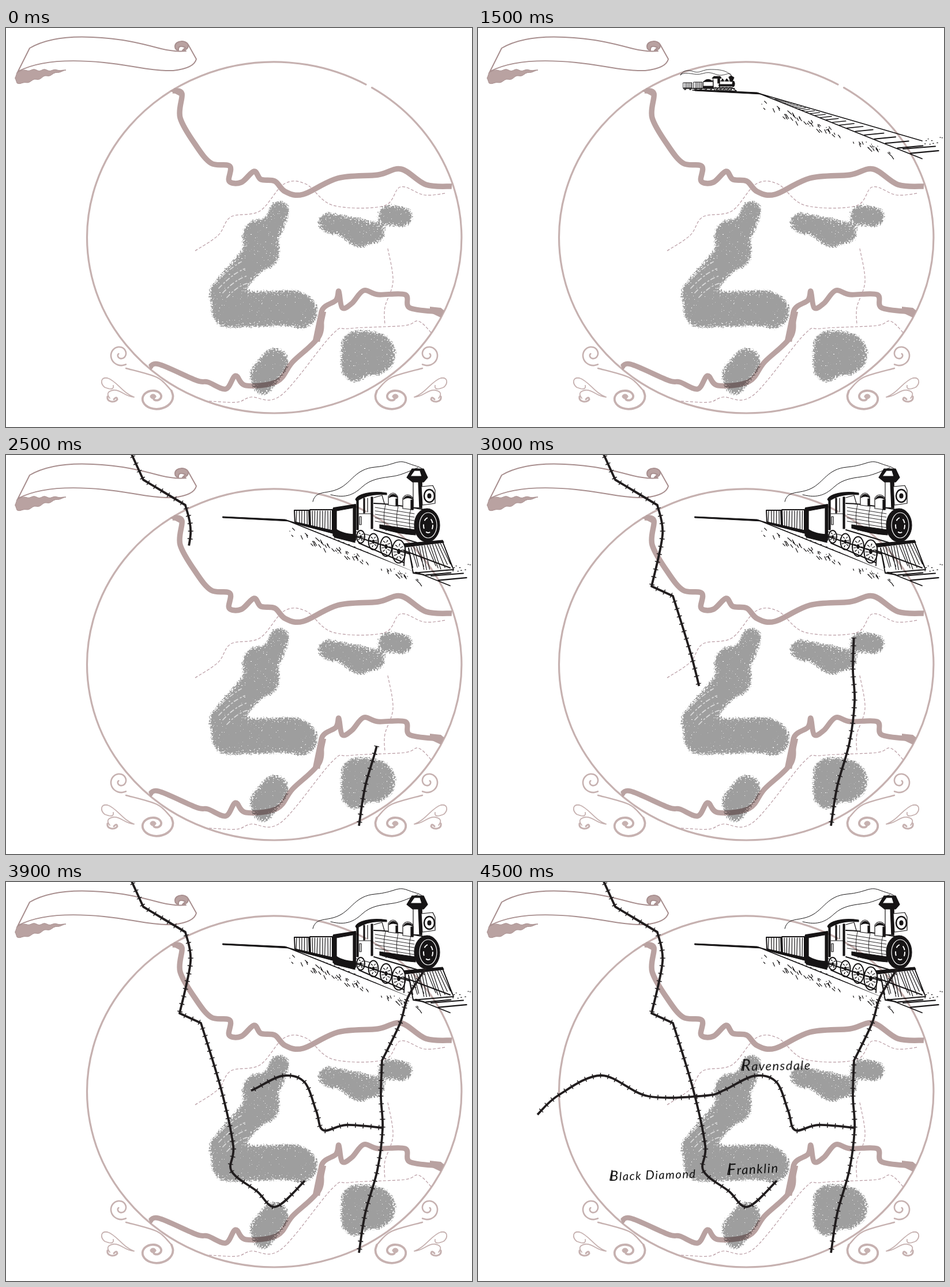
Write an HTML page that moves like this. It is 808 px wide and 693 px high and loops after 6100 ms.

```html
<!DOCTYPE html>
<html lang="en">
<head>
<meta charset="utf-8">
<title>Railway map</title>
<style>
html, body { margin: 0; width: 100%; height: 100%; overflow: hidden; background: #fff; }
svg { display: block; width: 100vw; height: 100vh; }
path, ellipse { fill: none; stroke-linecap: round; stroke-linejoin: round; }
.ink { stroke: #161415; }
.ink .solid { fill: #161415; }
.ink .paper { fill: #fff; }
.rose { stroke: #c6b1b0; }
.river { stroke: #b9a2a1; stroke-linecap: butt; }
.banner { stroke: #a88f8f; stroke-width: 2; }
.banner .solid { fill: #b9a2a1; }
.dash { stroke: #b99ba3; stroke-width: 1.2; stroke-dasharray: 5 3; stroke-linecap: butt; }
.wood { stroke: #9e9e9e; }
.multiply { mix-blend-mode: multiply; }
.line { stroke: #211d1e; stroke-width: 3.8; }
.ties { stroke: #211d1e; stroke-width: 9; stroke-dasharray: 1.5 12; stroke-dashoffset: -6; stroke-linecap: butt; }
.reveal { stroke: #fff; stroke-width: 18; stroke-dasharray: 1 2; stroke-linecap: butt; }
text { font: italic 22px Lato, "Open Sans", sans-serif; fill: #111; }

.rails, .far, .near, .mid, .engine, .reveal, .labels { animation: 6.1s step-end infinite; }
.rails { animation-name: rails; }
.far { animation-name: far; }
.near { animation-name: near; }
.mid { animation-name: mid; }
.engine { animation-name: engine; }
.labels { animation-name: labels; }
.main { animation-name: main; }
.branch { animation-name: branch; }
@keyframes rails { 0% { opacity: 0 } 8.1967%, 100% { opacity: 1 } }
@keyframes far { 0% { opacity: 0 } 16.3934% { opacity: 1 } 24.5901%, 100% { opacity: 0 } }
@keyframes near { 0% { opacity: 0 } 24.5901% { opacity: 1 } 32.7868%, 100% { opacity: 0 } }
@keyframes mid { 0% { opacity: 0 } 32.7868% { opacity: 1 } 40.9836%, 100% { opacity: 0 } }
@keyframes engine { 0% { opacity: 0 } 40.9836%, 100% { opacity: 1 } }
@keyframes labels { 0% { opacity: 0 } 73.7704%, 100% { opacity: 1 } }
@keyframes main {
  0% { stroke-dashoffset: 1.01 } 40.9836% { stroke-dashoffset: .725 }
  49.1803% { stroke-dashoffset: .36 } 57.3770%, 100% { stroke-dashoffset: 0 }
}
@keyframes branch {
  0% { stroke-dashoffset: 1.01 } 60.6557% { stroke-dashoffset: .78 } 63.9344% { stroke-dashoffset: .544 }
  67.2131% { stroke-dashoffset: .275 } 70.4918%, 100% { stroke-dashoffset: 0 }
}
</style>
</head>
<body>
<svg viewBox="0 0 808 693" preserveAspectRatio="none">
<defs>
  <filter id="grain" filterUnits="userSpaceOnUse" x="300" y="270" width="440" height="400" color-interpolation-filters="sRGB">
    <feGaussianBlur in="SourceAlpha" stdDeviation="7" result="soft"/>
    <feTurbulence type="fractalNoise" baseFrequency=".37 .41" numOctaves="3" seed="4" result="noise"/>
    <feComposite in="soft" in2="noise" operator="arithmetic" k1="3" k4="-.55"/>
    <feComponentTransfer result="spray"><feFuncA type="linear" slope="5"/></feComponentTransfer>
    <feFlood flood-color="#9e9e9e"/>
    <feComposite in2="spray" operator="in"/>
  </filter>

  <g id="train" class="ink" stroke-width=".9">
    <path stroke-width=".8" d="M351 82C356 72 366 73 375 76S390 72 402 72S432 72 440 84M351 81C363 74 375 84 390 79S412 83 422 82S437 76 439 82"/>
    <path class="paper" d="M356 95H371V104H356ZM374 94H389V105H374ZM391 93L408 91V104H391ZM408 87H419V104H408ZM419 92H442V103H419Z"/>
    <path class="solid" d="M391 93Q399 85 407 93ZM406 87L409 84H420L422 87ZM391 101H408V104H391ZM416 88H419V96H416ZM422 92Q424 84 426 92ZM429 92Q431 84 434 92ZM435 85L439 83L444 86L441 93H438ZM418 98H443V101H418Z"/>
    <ellipse class="solid" cx="443" cy="97" rx="2" ry="5"/>
    <path stroke-width="1.4" d="M356 105H445M440 104L448 109M372 108L448 109.5"/>
    <g id="small"></g>
  </g>
</defs>

<g class="rails ink">
  <path class="solid" stroke-width="1" d="M376 107L484 112L492 115L376 109Z"/>
  <path stroke-width="1.8" d="M485 113L770 196M488 114L770 227"/>
  <g id="sleepers"></g>
  <path id="grass" stroke-width="1.2"/>
</g>

<use class="far" href="#train" transform="translate(-40 1)"/>
<use class="near" href="#train"/>
<use class="mid" href="#train" transform="translate(340 40) scale(2.86) translate(-350 -71)"/>

<g class="engine ink" stroke-width="1.2">
  <path fill="#fff" style="fill:#fff" stroke="none" d="M500 95L607 86L640 64H698L705 22H728L745 60L753 150L776 199L708 203L600 157L500 118Z"/>
  <path stroke-width="1" d="M532 81C537 60 556 69 578 58S606 24 640 21S678 7 696 14S722 20 726 30M563 69C590 76 604 68 618 55S650 40 664 38S682 36 714 22"/>
  <!-- wagons and tender -->
  <path stroke-width="2" d="M500 96H525L526 124L501 117ZM527 95H566V135L528 125ZM568 92L606 86V148L568 140Z"/>
  <path class="solid" d="M501 116L566 131V136L501 119ZM567 93L606 86V91L573 97V140H567ZM569 126Q580 137 605 138V152L569 143ZM602 92H606V140H602Z"/>
  <path id="planks"/>
  <!-- cab and boiler -->
  <path class="solid" d="M606 77C610 68 632 62 660 66V69C640 67 622 71 608 80ZM608 78H611V130H608ZM620 75H622V101H620ZM633 73H636V128H633Z"/>
  <path d="M612 102H634M627 75V99M613 107H616V121H613ZM638 74L652 70L656 84M606 133L640 142"/>
  <path id="boiler" stroke-width=".9"/>
  <path stroke-width="2" d="M638 84C665 84 695 90 727 95M638 130L712 152"/>
  <path class="solid" d="M648 121L710 130V139Q680 137 648 127Z"/>
  <ellipse class="solid" cx="730" cy="122" rx="22" ry="29"/>
  <ellipse cx="732" cy="122" rx="15" ry="22" style="stroke:#fff"/>
  <ellipse cx="732" cy="122" rx="8" ry="13" style="stroke:#fff" stroke-width="2" stroke-dasharray="6 8"/>
  <!-- domes, chimney, lamp -->
  <path class="paper" d="M663 87V72Q671 60 679 72V89ZM688 93V75Q696 63 706 75V95ZM706 45V91L721 92V46Z"/>
  <path class="solid" d="M664 74Q671 62 679 74Q671 70 664 74ZM689 77Q696 65 706 77Q696 72 689 77ZM676 76H679V88H676ZM702 78H706V95H702ZM715 47H721V92H717Z"/>
  <path class="solid" d="M695 39L704 24H724L731 39L724 47H705Z"/>
  <path style="fill:#fff" d="M701 37L708 27H718L721 37Z"/>
  <path class="paper" d="M720 55L740 53L744 61V84L722 87Z"/>
  <ellipse class="paper" cx="734" cy="71" rx="9" ry="11" stroke-width="2.5"/>
  <ellipse class="solid" cx="734" cy="71" rx="3" ry="4"/>
  <!-- running gear -->
  <g id="drivers"></g>
  <path stroke-width="2" d="M608 142L700 172M612 153L690 187M690 166L770 196"/>
  <path class="solid" d="M690 154L757 148L759 152L692 160Z"/>
  <path stroke-width="1.8" d="M692 160L690 192M698 162L706 205L776 199L758 153M706 205L725 208"/>
  <path id="catcher"/>
</g>

<g class="multiply">
  <path class="rose" stroke-width="3.2" d="M634.5 103.7A324.5 305 0 0 1 465 669A324.5 305 0 1 1 624 98.1"/>
  <g id="rivers"></g>
  <path style="fill:#b9a2a1" d="M284 109L294 105L307 111L303 119ZM735 484L754 486L760 491L754 503L735 494Z"/>
  <g id="trails"></g>

  <g class="banner">
    <path d="M41 35C70 18 110 14 150 16C200 18 235 27 265 35Q292 42 312 40M22 75C60 55 120 55 170 60S250 75 290 74Q326 70 330 54L316 29M41 35L19 79"/>
    <path class="solid" d="M293 32C293 21 314 20 316 30Q316 38 306 39L311 34Q298 28 299 39Q293 38 293 32Z"/>
    <path id="tail" class="solid" stroke-width="1"/>
  </g>

  <g id="scroll" class="rose">
    <path stroke-width="1.8" d="M222 641C202 634 192 613 176 608C164 606 163 617 171 624Q188 631 186 621M222 641C205 640 200 628 186 629Q171 632 180 643"/>
    <path stroke-width="3" d="M176 640C174 651 190 651 193 645Q192 639 187 645"/>
    <ellipse cx="255" cy="640" rx="5" ry="4" style="fill:#c6b1b0"/>
  </g>
  <use href="#scroll" transform="translate(930) scale(-1 1)"/>

  <g class="multiply">
    <!-- fat strokes, turned into sprayed patches -->
    <g class="wood" filter="url(#grain)">
      <path stroke-width="32" d="M474 317L462 350M558 338L640 356M662 325L688 328M446 600V620"/>
      <path stroke-width="46" d="M608 354L616 357M466 580L447 604M376 462L430 400M606 550L605 590"/>
      <path stroke-width="58" d="M440 362L444 390M386 490L500 486L510 492"/>
      <path stroke-width="72" d="M622 563L638 566"/>
    </g>
    <path id="streaks" stroke="#fff" stroke-opacity=".6" stroke-width="1.8" stroke-dasharray="7 5 2 4"/>
  </g>
</g>

<g id="tracks"></g>

<g class="labels">
  <g transform="translate(457 328) rotate(-1)"><text letter-spacing="1.4"><tspan font-size="27">R</tspan>avensdale</text><path class="ink" stroke-width="1.6" d="M5 -20L0 -1"/></g>
  <g transform="translate(229 519) rotate(-2)"><text style="font-size:20px" letter-spacing="1.5"><tspan font-size="24">B</tspan>lack <tspan font-size="22">D</tspan>iamond</text><path class="ink" stroke-width="1.6" d="M4 -18L0 -1H4"/></g>
  <g transform="translate(433 509) rotate(-3)"><text letter-spacing="1.6"><tspan font-size="27">F</tspan>ranklin</text><path class="ink" stroke-width="1.6" d="M5 -20L0 -1H4"/></g>
</g>
</svg>

<script>
const $ = id => document.getElementById(id);
const add = (id, html) => $(id).insertAdjacentHTML('beforeend', html);
const pathTag = (d, attrs = '') => `<path d="${d}" ${attrs}/>`;
const times = (n, fn) => Array.from({ length: n }, (_, i) => fn(i, i / (n - 1)));

let seed = 11;
const rand = (a, b) => {
  seed = (seed * 16807) % 2147483647;
  return a + (b - a) * seed / 2147483647;
};

// Smooth curve through points
function smooth(p) {
  const at = i => p[Math.max(0, Math.min(p.length - 1, i))];
  return p.slice(1).map((c, i) => {
    const a = at(i - 1), b = at(i), e = at(i + 2);
    const c1 = [0, 1].map(k => b[k] + (c[k] - a[k]) / 6);
    const c2 = [0, 1].map(k => c[k] - (e[k] - b[k]) / 6);
    return `C${c1} ${c2} ${c}`;
  }).join('');
}

// "x y x y | x y": smooth within a piece, sharp corner at each bar
function curve(spec) {
  let last, d = '';
  for (const piece of spec.split('|')) {
    const v = piece.trim().split(' ').map(Number);
    const p = last ? [last] : [];
    for (let i = 0; i < v.length; i += 2) p.push([v[i], v[i + 1]]);
    if (!last) d = `M${p[0]}`;
    d += smooth(p);
    last = p[p.length - 1];
  }
  return d;
}

function spiral(cx, cy, r, start, turns, squash) {
  const p = times(24, (i, t) => {
    const a = start + t * turns * 2 * Math.PI, q = r * (1 - t) + 3;
    return [cx + q * Math.cos(a), cy + q * Math.sin(a) * squash];
  });
  return `M${p[0]}` + smooth(p);
}

const river = (spec, w) => add('rivers', pathTag(curve(spec), `class="river" stroke-width="${w}"`));
river('290 109 305 114 302 156 330 205 356 235 388 240 387 266 408 268 430 249 442 263 466 266 484 284 515 289 575 261 645 255 685 245 728 272 773 275', 9.5);
river('249 590 265 584 330 612 350 615 381 627 398 604 416 621 470 614 497 580 543 535 548 490 572 473 577 457 583 486 600 478 620 456 645 463 692 463 700 486 750 493', 9);
river('538 544 544 515 549 492', 12.5);

[
  '328 387 368 360 390 328 440 318 482 271 520 271 567 308 655 309 684 276 725 290 762 287',
  '662 383 671 440 657 485 657 516',
  '352 648 400 650 425 641 477 638 565 533 595 522 690 517 715 509 738 530'
].forEach(spec => add('trails', pathTag(curve(spec), 'class="dash"')));

add('scroll', pathTag(spiral(198, 567, 17, 1.05, 1.4, 1), 'stroke-width="2.6"'));
add('scroll', pathTag(curve('208 591 262 607 286 629'), 'stroke-width="2.4"'));
add('scroll', pathTag(spiral(258, 642, 30, -.5, 1.45, .75), 'stroke-width="3.8"'));

// Rippled, tapering end of the banner
const edge = side => times(30, (i, t) => [
  16 + 88 * t,
  87 - 14 * t + side * 11 * Math.sin(Math.PI * t ** .35) + 2 * Math.sin(t * 30) * t * (1 - t) * 3
]);
$('tail').setAttribute('d', 'M' + [...edge(-1), ...edge(1).reverse()].join('L') + 'Z');

// Sleepers shrink towards the vanishing point
times(27, i => {
  const d = 308 * .912 ** i;
  add('sleepers', pathTag(`M${490 + d * .845} ${114.5 + d * .335}L${490 + d} ${114 + d * .322}h.5`, `stroke-width="${.7 + d / 200}"`));
});
add('sleepers', pathTag('M737 210L793 205.5', 'stroke-width="2"'));

const tufts = times(68, () => {
  const x = rand(492, 722), y = 114 + (x - 488) * .4 + rand(9, 26 - (x - 490) * .04);
  const s = rand(0, 1) < .5 ? .4 : rand(3, 9);
  return `M${x} ${y}l${s * rand(.3, .9)} ${s * .8}`;
});
const dots = times(9, () => `M${rand(772, 806)} ${rand(189, 203)}h1.5`);
$('grass').setAttribute('d', tufts.concat(dots).join(''));

const wheel = (x, y, rx, ry, w) => {
  const ring = (k, attrs) => `<ellipse cx="${x}" cy="${y}" rx="${rx * k}" ry="${ry * k}" ${attrs}/>`;
  return ring(1, `class="paper" stroke-width="${w}"`) +
    ring(.55, `stroke-width="${rx * .5}" stroke-dasharray="1.2 4" style="stroke-linecap:butt"`) +
    ring(.2, 'class="solid"');
};
times(6, i => add('small', wheel(359 + i * 9, 106, 1.5, 1.5, 1)));
times(5, i => add('small', wheel(412 + i * 6.3, 105.8, 2.5, 2.7, 1.1)));
times(5, i => add('small', pathTag(`M${359 + i * 2.6} 95v9m${18 - i * .1} -10v11`)));
times(4, i => add('drivers', wheel(615 + i * 22, 142 + i * 8.5, 7 + i * 1.5, 11 + i * 3, 2)));

$('planks').setAttribute('d',
  times(14, i => `M${504 + i * 4.5} 97l${rand(-1, 1)} ${20 + i * 1.1}`).join(''));
$('boiler').setAttribute('d',
  times(5, i => `M640 ${91 + i * 6}L708 ${102 + i * 6}`).join('') +
  times(3, i => `M${658 + i * 22} ${86 + i * 3}q-6 25 1 46`).join(''));
$('catcher').setAttribute('d', times(14, (i, t) =>
  `M${698 + 60 * t} ${161 - 8 * t}L${706 + 68 * t + rand(-3, 3)} ${204 - rand(2, 12) - 5 * t}`).join(''));
$('streaks').setAttribute('d', times(4, i => `M${362 + i * 7} ${444 + i * 8}q22 -24 ${46 - i} ${i * 4 - 38}`).join(''));

// Railway lines grow behind a revealing mask
function track(id, kind, spec) {
  const d = curve(spec);
  add('tracks',
    `<mask id="${id}" maskUnits="userSpaceOnUse" x="0" y="0" width="808" height="693">` +
    pathTag(d, `class="reveal ${kind}" pathLength="1"`) + '</mask>' +
    `<g mask="url(#${id})">${pathTag(d, 'class="line"')}${pathTag(d, 'class="ties"')}</g>`);
}
track('west', 'main', '217 -3 238 43 | 311 87 | 320 138 301 228 | 338 245 | 373 360 394 458 391 502 435 537 468 564 518 519');
track('east', 'main', '612 644 623 575 644 500 653 428 650 372 652 310 | 683 246 697 200 728 149');
track('cross', 'branch', '653 427 590 422 550 431 538 398 517 347 478 337 428 361 395 371 295 372 214 336 140 370 103 404');
</script>
</body>
</html>
```
